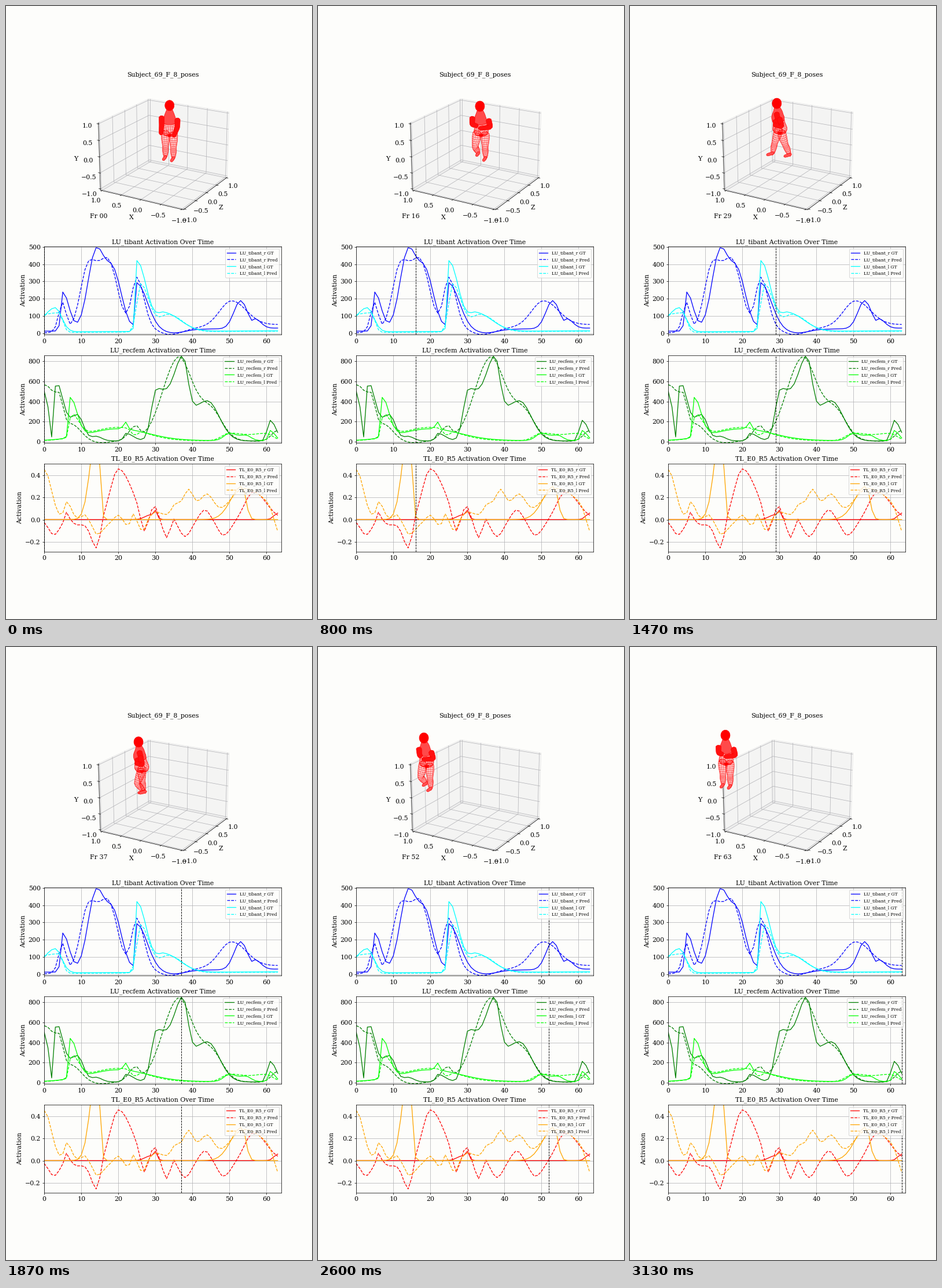
A matplotlib script for the animation above (3200 ms loop, 529 px wide and 1058 px high).

```python
import numpy as np
import matplotlib.pyplot as plt
from matplotlib.animation import FuncAnimation
from matplotlib.collections import LineCollection, PolyCollection
from matplotlib.gridspec import GridSpec
from matplotlib.ticker import MultipleLocator

W, H = 529, 1058
LOOP, SLOT = 3200, 40      # ms
POSES, SAMPLES = 48, 64    # shown steps and data samples per loop
LEAD = 27                  # ms, puts each step into the slot holding its start
PAPER = "#fdfdfb"

plt.rcParams.update({
    "font.family": "DejaVu Serif", "font.size": 12,
    "axes.titlesize": 12, "axes.labelsize": 12, "axes.facecolor": PAPER,
})
fig = plt.figure(figsize=(8, 16), dpi=W / 8, facecolor=PAPER)
xs = np.arange(SAMPLES)


# ---------------------------------------------------------------- curves
def curve(start, end, *bumps):
    """Straight base line plus bumps of (centre, height, rise, fall)."""
    y = np.linspace(start, end, SAMPLES)
    for centre, height, rise, fall in bumps:
        d = xs - centre
        y += height * np.exp(-.5 * (d / np.where(d < 0, rise, fall)) ** 2)
    return y


tibant = (
    curve(12, 30, (5, 225, .5, 1.7), (14, 462, 2.2, 2.3), (18.8, 310, 2, 2.2),
          (25, 268, .4, 2.8), (35, -20, 3, 3), (53, 162, 1.8, 1.8),
          (57.2, 45, .6, 1.5)),
    curve(3, 50, (5, 170, 1.1, .9), (12, 390, 2.2, 2.8), (17.6, 355, 2.3, 2.4),
          (25, 300, 1.4, 1.9), (34, -36, 2.5, 3.5), (50.5, 147, 3.2, 4)),
    curve(8, 14, (3, 140, 3.2, 1.7), (25, 410, .4, 2.6), (32.5, 105, 2, 4.2)),
    curve(4, 12, (4, 114, 9, 1), (26, 278, 1, 2.3), (33.5, 100, 2.5, 3.8)),
)
recfem = (
    curve(8, 8, (.5, 560, 1, .5), (3.2, 590, .5, 2), (9, 255, 1.8, 1.6),
          (14, 45, 1.2, 1.5), (22, 75, .6, 2), (30.2, 490, 1.3, 3),
          (37.3, 660, 2.6, 1.4), (44, 400, 5, 3.2), (61, 205, .8, 1.5)),
    curve(8, 6, (0, 560, 1, 4), (4.3, 150, 1, .7), (8.5, 90, 1.5, 2),
          (15.5, -19, 2, 2), (24.6, 135, 1.8, 1.1), (36, 780, 4.2, 3.4),
          (44.5, 330, 4.5, 3.3), (63, 108, 1.6, 1)),
    curve(10, 12, (7, 400, .4, 1.8), (20, 118, 8, 8), (22, 70, .6, .5),
          (50, 72, 1.5, 2), (54.5, 48, 1.5, 1.3), (61, 100, .5, 1.2)),
    curve(6, 12, (7.3, 235, .5, 2), (20, 135, 8, 7), (24.4, -60, .8, .7),
          (50, 75, 2, 5), (60, 60, 3, 1.7)),
)
rest = (
    curve(.002, .002, (28.5, .04, 1.4, 1), (30, .07, .5, .5), (63, .058, 1, 1)),
    curve(0, 0, (2.6, -.135, 1.4, 1.5), (6, .08, .5, .6), (9, -.045, 1.2, 2),
          (14.2, -.26, 1.5, .9), (20, .455, 2.1, 3.6), (27, -.17, 1, .7),
          (29.6, .12, .6, .9), (33, -.16, .9, .9), (35, .04, .5, .5),
          (38, -.15, 1.5, 1.6), (43.4, .09, 1.4, 1.2), (48.3, -.14, 1.4, 2),
          (56.5, .25, 2.3, 3.4)),
    curve(.002, .002, (14.3, .85, 1.8, .65), (53.4, .3, 3, 1)),
    curve(0, 0, (0, .45, 1, 1.9), (6.1, .16, .7, 1.2), (11, .045, 1, .6),
          (14.2, -.13, 1, 2), (19.8, .045, .8, .8), (22.5, -.055, .7, .7),
          (24, .06, .5, .5), (26.5, -.105, .8, .8), (30, .07, 1.2, 2.5),
          (35.6, .14, 1.2, 2), (39, .22, 1.2, 1.3), (43.8, .22, 2.2, 1.9),
          (54, .28, 4, 6), (63.3, -.2, 1.2, 1)),
)
PANELS = [
    ("LU_tibant", (-8, 501), 100, ("blue", "cyan"), tibant),
    ("LU_recfem", (-14, 862), 200, ("green", "lime"), recfem),
    ("TL_E0_R5", (-.284, .502), .2, ("red", "orange"), rest),
]

grid = GridSpec(4, 1, figure=fig, height_ratios=[5, 3, 3, 3], hspace=.2,
                left=.125, right=.9, bottom=.11, top=.88)
cursors = []
for row, (name, ylim, step, colors, data) in enumerate(PANELS, 1):
    ax = fig.add_subplot(grid[row])
    for k, ys in enumerate(data):
        side, pred = divmod(k, 2)
        ax.plot(xs, ys, "--" if pred else "-", color=colors[side], lw=1.4,
                label=f"{name}_{'rl'[side]} {'Pred' if pred else 'GT'}")
    cursors.append(ax.axvline(0, color="k", ls="--", lw=1))
    ax.set(xlim=(0, SAMPLES), ylim=ylim, ylabel="Activation",
           title=f"{name} Activation Over Time")
    ax.xaxis.set_major_locator(MultipleLocator(10))
    ax.yaxis.set_major_locator(MultipleLocator(step))
    ax.grid(True, color="#b0b0b4")
    ax.legend(loc="upper right", fontsize="x-small")

# ---------------------------------------------------------------- 3D box
stage = fig.add_axes([0, 0, 1, 1])
stage.set(xlim=(0, W), ylim=(H, 0))
stage.axis("off")

ELEV, TURN = np.radians(20), np.radians(30)
E = 1 + 1 / 24             # the walls stand a little outside the limits


def view(side, up, deep):
    """Pixel position of a point given along the camera's own directions."""
    scale = 1368 / (10 + deep * np.cos(ELEV) - up * np.sin(ELEV))
    return np.array([275 + scale * side,
                     250 - scale * (up * np.cos(ELEV) + deep * np.sin(ELEV))])


def project(x, y, z):
    side = z * np.sin(TURN) - x * np.cos(TURN)
    deep = x * np.sin(TURN) + z * np.cos(TURN)
    return view(.5714 * side, .4286 * y, .5714 * deep)


def path3(points, color, z=1):
    stage.plot(*zip(*(project(*p) for p in points)), color=color, lw=.8,
               zorder=z, solid_capstyle="butt")


for pane in ([(E, -E, -E), (E, -E, E), (E, E, E), (E, E, -E)],
             [(-E, -E, E), (E, -E, E), (E, E, E), (-E, E, E)],
             [(-E, -E, -E), (E, -E, -E), (E, -E, E), (-E, -E, E)]):
    stage.fill(*zip(*(project(*p) for p in pane)), fc="#f4f4f3",
               ec="#e8e8e8", lw=.8, zorder=0)

ticks = np.linspace(-1, 1, 5)
out, inn = E + .045, E - .02
for v in ticks:
    for line in ([(v, -E, -E), (v, -E, E), (v, E, E)],
                 [(-E, -E, v), (E, -E, v), (E, E, v)],
                 [(E, v, -E), (E, v, E), (-E, v, E)]):
        path3(line, "#b2b2b6")
    path3([(v, -E, -out), (v, -E, -inn)], "k", 2)
    path3([(-out, -E, v), (-inn, -E, v)], "k", 2)
    path3([(out, v, -E), (inn, v, -E)], "k", 2)
path3([(E, E, -E), (E, -E, -E), (-E, -E, -E), (-E, -E, E)], "k", 2)


def label(x, y, s, **kw):
    return stage.text(x, y, s, **{"ha": "center", "va": "center",
                                  "zorder": 9, **kw})


def tick_labels(low, middle, high):
    """Labels on the parabola through three points."""
    curve_xy = np.polyfit([-1, 0, 1], [low, middle, high], 2)
    for v in ticks:
        x, y = v ** np.array([2, 1, 0]) @ curve_xy
        label(x, y, f"{v:.1f}".replace("-", "\u2212"))


tick_labels((299.3, 371), (226.5, 353.5), (155, 336))
tick_labels((144, 325), (142, 267), (140.3, 207))
tick_labels((317.7, 370), (356.7, 339), (392.5, 311))
label(216.5, 365, "X")
label(120.5, 264, "Y")
label(371, 348, "Z")
label(271, 121.5, "Subject_69_F_8_poses", va="baseline")
counter = label(144.6, 366.5, "", ha="left", va="baseline")

# ---------------------------------------------------------------- walker
FLOOR = -.4286
UP = np.array([0, 1, 0])

fills = PolyCollection([], fc="#ffdede", ec="none", zorder=3)
mesh = LineCollection([], colors="red", lw=.5, zorder=4)
solid = PolyCollection([], ec="red", lw=.7, zorder=5)
for part in (fills, mesh, solid):
    stage.add_collection(part, autolim=False)


def ease(t):
    t = np.clip(t, 0, 1)
    return t * t * (3 - 2 * t)


def bend(points, rows):
    """Rounded run through the points."""
    u = np.linspace(0, len(points) - 1, rows)
    p = np.asarray(points, float).reshape(len(points), -1)
    p = np.stack([np.interp(u, range(len(p)), col) for col in p.T], 1)
    p[1:-1] = (p[:-2] + 2 * p[1:-1] + p[2:]) / 4
    return p


def tube(path, half, rows=16, cols=6):
    """Outline and surface lines of a tapered limb along a path."""
    c, w = bend(path, rows), bend(half, rows)
    w = w * np.sqrt(np.clip(1 - np.linspace(-1, 1, rows) ** 14, .12, 1))[:, None]
    t = np.gradient(c, axis=0)
    t /= np.hypot(*t.T)[:, None] + 1e-6
    n = np.stack([-t[:, 1], t[:, 0]], 1) * w
    phi = np.linspace(-np.pi / 2, np.pi / 2, cols + 2)
    lines = [c + n * np.sin(a) for a in phi]
    lines += [c[i] + np.outer(np.sin(phi), n[i])
              + np.outer(np.cos(phi), t[i]) * 1.6 for i in range(rows)]
    return np.concatenate([c + n, (c - n)[::-1]]), lines


def mid(a, b, f=.5):
    return a + (b - a) * f


def skeleton(n):
    """Joint pixels of head, arms and legs at sample n."""
    go = ease((n - 14) / 54)
    walk = np.clip(min((n - 10) / 6, (63 - n) / 9), 0, 1)
    fold = ease((n - 8) / 7)
    turn = np.radians(25 + 60 * np.exp(-((n - 37) / 14) ** 4))
    phase = np.radians(np.interp(n, [16, 29, 44, 52, 63],
                                 [-90, 0, 180, 270, 360]))

    ahead = np.array([-np.sin(turn), 0, -np.cos(turn)])
    right = np.array([-np.cos(turn), 0, np.sin(turn)])
    root = np.array([.06 - .98 * go, FLOOR, .8 + .56 * go])
    lean = ahead * .03 * walk

    def swing(length, angle, forward=ahead):
        return length * (1.2 * np.sin(angle) * forward - np.cos(angle) * UP)

    arms, legs = [], []
    for sign, ph in ((1, phase), (-1, phase + np.pi)):
        lift = max(0, -np.sin(ph))
        thigh = walk * np.radians(15 * np.cos(ph) + 16 * lift)
        shin = thigh - walk * np.radians(5 + 50 * lift)
        hip = root + right * .06 * sign + UP * .40
        knee = hip + swing(.205, thigh)
        ankle = knee + swing(.155, shin)
        toe = ankle + ahead * .085 - UP * .022
        legs.append([view(*p) for p in (hip, knee, ankle, toe)])

        flex = np.radians(mid(40, 98, fold) if sign > 0 else mid(28, 86, fold))
        inward = np.radians(mid(20, 55, fold))
        reach = np.cos(inward) * ahead - np.sin(inward) * sign * right
        shoulder = root + right * .118 * sign + UP * .625 + lean
        elbow = (shoulder + swing(.13, -.2 * fold)
                 + right * .02 * sign * fold)
        hand = elbow + swing(.14, flex, reach)
        arms.append([view(*p) for p in (shoulder, elbow, hand)])
    head = view(*(root + UP * .785 + 1.4 * lean))
    return head, arms, legs


def draw_body(n):
    head, arms, legs = skeleton(n)
    soft, lines, hard, tints = [], [], [], []

    def add_soft(*args):
        outline, wires = tube(*args)
        soft.append(outline)
        lines.extend(wires)

    def add_hard(outline, tint="red"):
        hard.append(outline)
        tints.append(tint)

    for hip, knee, ankle, toe in legs:
        add_soft([hip - (0, 3), mid(hip, knee, .45), knee,
                  mid(knee, ankle, .4), ankle + (0, 2)],
                 [7.5, 7.2, 5, 5.3, 2.8], 17)
        heel = ankle + (ankle - toe) * .25
        add_hard(tube([heel, mid(heel, toe), toe], [2, 2.5, 2], 9)[0],
                 "#ff5050")

    chest = mid(arms[0][0], arms[1][0])
    pelvis = mid(legs[0][0], legs[1][0])
    waist = mid(chest, pelvis, .5)
    add_soft([chest, waist, pelvis - (0, 2), pelvis + (0, 6)],
             [10.5, 10, 13, 9], 15, 10)
    add_hard(tube([head + (0, 4), chest - (0, 5), chest + (0, 4), waist],
                  [3.6, 8, 11, 10])[0], "#ff4a4a")
    add_hard(pelvis + [(-4, 3), (4, 3), (1, 7), (-1, 7)])
    for arm in arms:
        add_hard(tube(arm, [4.8, 4.2, 3.5])[0], "#ff1010")
    a = np.linspace(0, 2 * np.pi, 36)
    add_hard(head + np.stack([8 * np.cos(a), 9 * np.sin(a)], 1))

    fills.set_verts(soft)
    mesh.set_segments(lines)
    solid.set_verts(hard)
    solid.set_facecolor(tints)


def draw(i):
    k = (i * SLOT + LEAD) * POSES // LOOP
    n = round(k * SAMPLES / POSES)
    for c in cursors:
        c.set_xdata([n, n])
    counter.set_text(f"Fr {n:02d}")
    draw_body(n)
    return [*cursors, counter, fills, mesh, solid]


anim = FuncAnimation(fig, draw, frames=LOOP // SLOT, interval=SLOT,
                     init_func=lambda: draw(0), repeat=True, repeat_delay=0)
plt.show()
```
